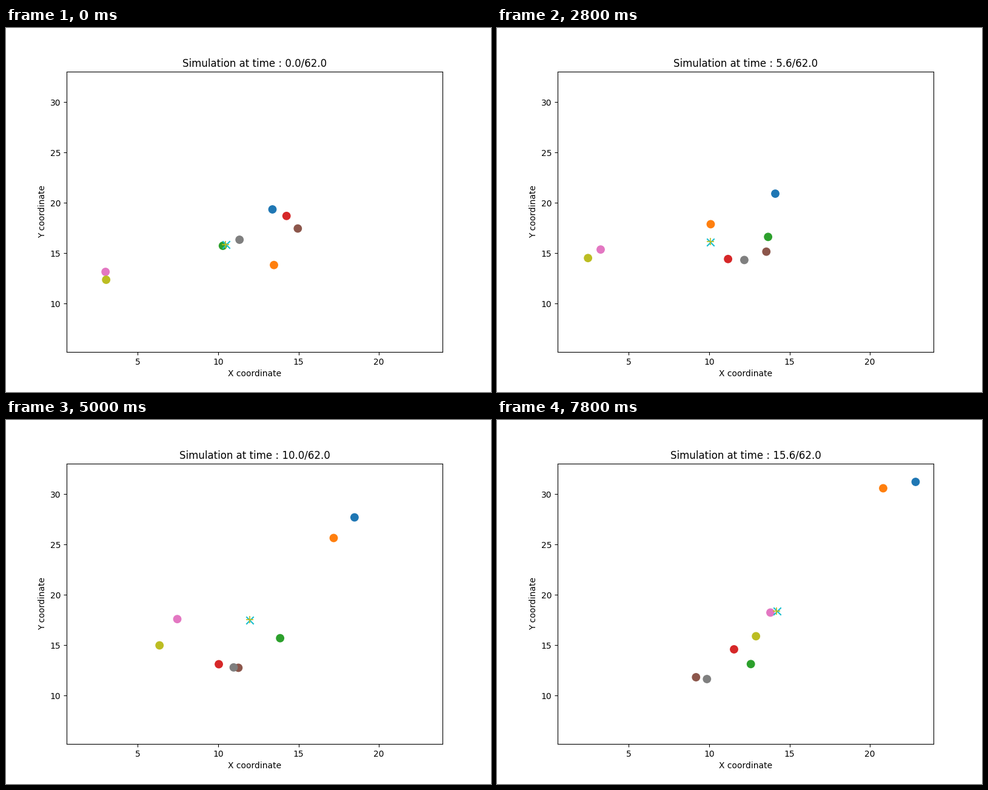
Recreate the animation shown at these times as a matplotlib script. Size 800 by 600 pixels, loop 8000 ms.

```python
import numpy as np
import matplotlib.pyplot as plt
from matplotlib.animation import FuncAnimation

W, H = 800, 600
FRAMES, INTERVAL = 40, 200
DT, T_END = 0.4, 62.0
XLIM, YLIM = (0.5863, 23.9473), (5.205, 33.036)
LEFT, RIGHT, TOP, BOTTOM = 100, 720, 72, 534

# Every agent glides through a few waypoints (stage pixels) at shared steps
STEPS = (0, 8, 21, 32, 39)
AGENTS = {
    "C0": [(439.5, 299), (422, 320), (531, 194), (649, 115.3), (690.5, 102)],
    "C1": [(442, 390.7), (410.5, 396), (414, 197.7), (631, 128.6), (637, 112.5)],
    "C2": [(357.7, 359), (422.3, 347), (455.7, 350), (436, 382), (418.7, 402.3)],
    "C3": [(462.7, 309.8), (418.6, 355.3), (350.2, 399), (369, 397.5), (391, 378)],
    "C5": [(481.3, 330.5), (468.6, 348.7), (407, 394), (345.2, 427.3), (328.3, 424)],
    "C6": [(164.2, 402), (146.2, 383.7), (232.4, 342), (379.2, 310.6), (451, 317.4)],
    "C7": [(385.2, 349), (408, 367.3), (393, 399.4), (345.4, 420), (346.3, 427)],
    "C8": [(165.2, 415), (133.8, 388.7), (204.7, 374), (350.5, 366.8), (427.2, 356.4)],
}
# Sharp swerves on the way: step, x, y
SWERVES = {"C1": [(14, 352.5, 323.4), (25, 540.5, 194.5)]}
GUESS_BIAS = (0.3, 0.4)


def glide(color):
    """Cubic Hermite curve through an agent's waypoints, one row per frame."""
    rows = [(s, *xy) for s, xy in zip(STEPS, AGENTS[color])]
    rows = np.array(sorted(rows + SWERVES.get(color, [])), float)
    t, p = rows[:, 0], rows[:, 1:]
    m = np.gradient(p, t, axis=0, edge_order=2)
    f = np.arange(FRAMES)
    k = np.clip(np.searchsorted(t, f, side="right") - 1, 0, len(t) - 2)
    h = (t[k + 1] - t[k])[:, None]
    u = (f - t[k])[:, None] / h
    return ((2 * u**3 - 3 * u**2 + 1) * p[k] + (u**3 - 2 * u**2 + u) * h * m[k]
            + (3 * u**2 - 2 * u**3) * p[k + 1] + (u**3 - u**2) * h * m[k + 1])


def to_data(px):
    x = XLIM[0] + (px[..., 0] - LEFT) / (RIGHT - LEFT) * (XLIM[1] - XLIM[0])
    y = YLIM[0] + (BOTTOM - px[..., 1]) / (BOTTOM - TOP) * (YLIM[1] - YLIM[0])
    return np.stack([x, y], axis=-1)


stage = np.array([glide(c) for c in AGENTS])
centre = stage.mean(axis=0)
paths = to_data(stage)
mean_path = to_data(centre)
guess_path = to_data(centre + GUESS_BIAS)

fig, ax = plt.subplots(figsize=(W / 100, H / 100), dpi=100)
fig.subplots_adjust(left=LEFT / W, right=RIGHT / W,
                    bottom=1 - BOTTOM / H, top=1 - TOP / H)
ax.set(xlim=XLIM, ylim=YLIM, xlabel="X coordinate", ylabel="Y coordinate",
       xticks=range(5, 21, 5), yticks=range(10, 31, 5))
title = ax.set_title("")

dots = ax.scatter(*paths[:, 0].T, s=80, c=list(AGENTS))
guess = ax.scatter(*guess_path[0], s=80, c="C9", marker="x")
mean = ax.scatter(*mean_path[0], s=80, c="C8", marker="+", linewidths=1.2)


def update(i):
    dots.set_offsets(paths[:, i])
    guess.set_offsets(guess_path[i])
    mean.set_offsets(mean_path[i])
    title.set_text(f"Simulation at time : {i * DT:.1f}/{T_END}")
    return dots, guess, mean, title


anim = FuncAnimation(fig, update, frames=FRAMES, interval=INTERVAL,
                     repeat=True, repeat_delay=0)
plt.show()
```
